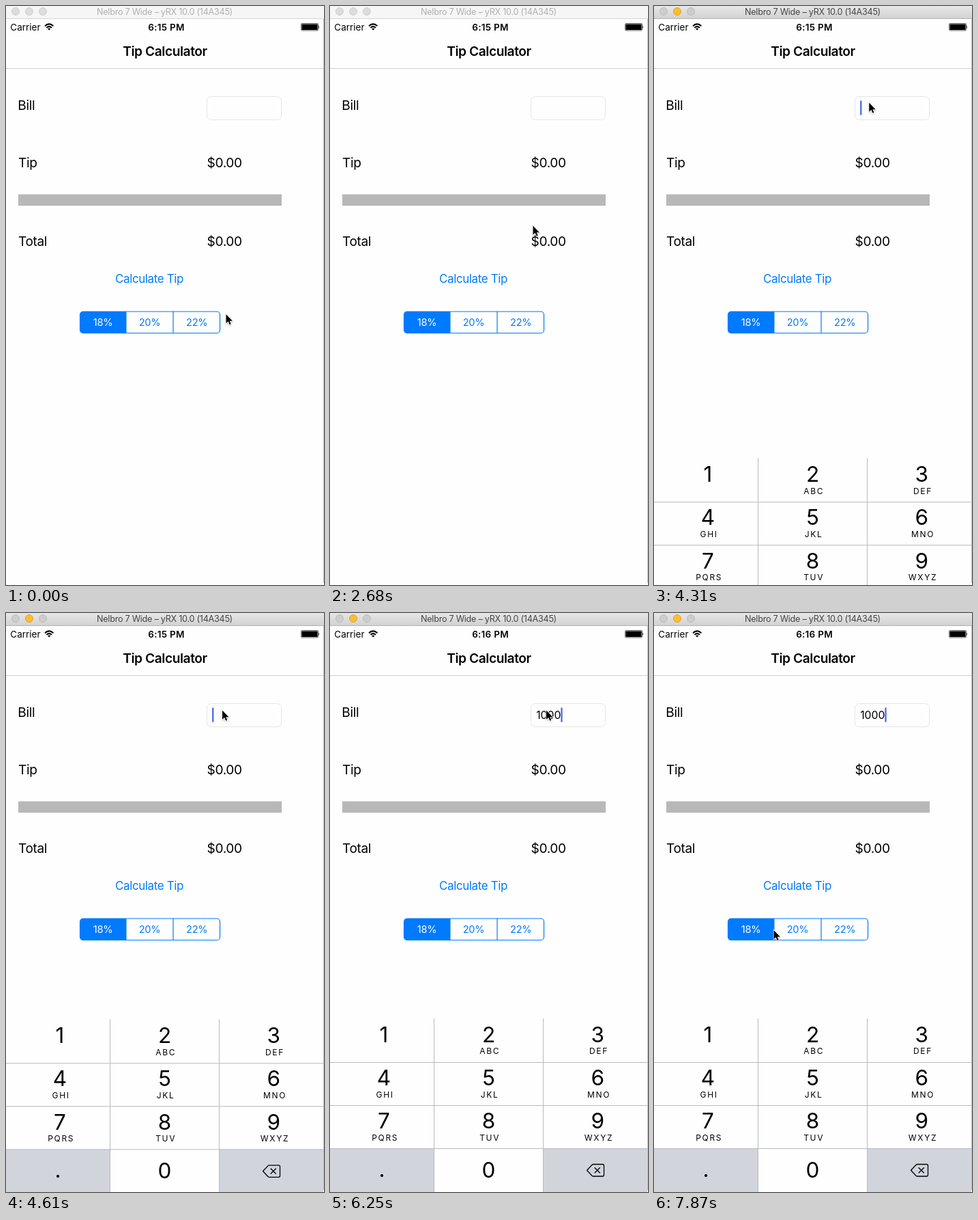
An HTML page for the animation above (8 s loop, 466 px wide and 847 px high).

```html
<!DOCTYPE html>
<html lang="en">
<head>
<meta charset="utf-8">
<title>Tip Calculator</title>
<style>
  html, body { margin: 0; width: 100%; height: 100%; overflow: hidden; background: #fefefe; }
  svg { display: block; width: 100vw; height: 100vh; }
  text { font-family: Inter, "Open Sans", sans-serif; font-size: 19.1px; letter-spacing: -.02em; white-space: pre; }
  .mid { text-anchor: middle; }
  .bold { font-weight: 600; }
  .status { font-size: 13.5px; letter-spacing: 0; }
  .clock { letter-spacing: .02em; }
  .bar { font-size: 12.6px; fill: #b0b0b0; }
  .button { font-size: 16.9px; fill: #007aff; }
  .seg { font-size: 14.6px; fill: #007aff; }
  .seg.on { fill: #fff; }
  .input { font-size: 15.75px; letter-spacing: 0; }
  .digit { font-size: 31.5px; letter-spacing: 0; }
  .letters { font-size: 12px; letter-spacing: 1.7px; }

  .chrome { fill: #f6f6f6; }
  .rule { stroke: #d6d6d6; }
  .light { fill: #dcdcdc; stroke: #d0d0d0; }
  .active .chrome { fill: url(#chrome); }
  .active .rule { stroke: #b4b4b4; }
  .active .bar { fill: #454545; }
  .active .light { fill: #cdcdcd; stroke: #bcbcbc; }
  .active .amber { fill: #fdbe30; stroke: #e0a32a; }
</style>
</head>
<body>
<svg viewBox="0 0 466 847" preserveAspectRatio="none">
  <defs>
    <linearGradient id="chrome" x2="0" y2="1">
      <stop stop-color="#e7e7e7"/><stop offset="1" stop-color="#d2d2d2"/>
    </linearGradient>
    <filter id="soft" x="-50%" y="-50%" width="200%" height="200%">
      <feDropShadow dx="0" dy="1" stdDeviation="1" flood-opacity=".35"/>
    </filter>
  </defs>
  <rect width="466" height="847" fill="#fefefe"/>

  <g id="window">
    <rect class="chrome" width="466" height="18"/>
    <path class="rule" d="M0 18.5H466"/>
    <circle class="light" cx="14" cy="8" r="5.5"/>
    <circle class="light amber" cx="34" cy="8" r="5.5"/>
    <circle class="light" cx="54" cy="8" r="5.5"/>
    <text class="bar mid" x="232.5" y="13">Nelbro 7 Wide – yRX 10.0 (14A345)</text>
  </g>

  <text class="status" x="6.3" y="35.5">Carrier</text>
  <g fill="none" stroke="#000" stroke-width="2">
    <path d="M57 29.2Q63.2 23.6 69.4 29.2M59.4 31.8Q63.2 28.4 67 31.8"/>
    <path d="M61 33.2Q63.2 31.6 65.4 33.2L63.2 35.6Z" fill="#000" stroke="none"/>
  </g>
  <text id="clock" class="status clock bold mid" x="235" y="35.5"></text>
  <rect x="432.5" y="25.5" width="25" height="10.5" rx="1.5" fill="none" stroke="#000" stroke-width=".6"/>
  <rect x="433.4" y="26.4" width="23.2" height="8.7" rx=".6"/>
  <path d="M458.3 28.8q1.8 2 0 4z"/>

  <text class="bold mid" x="233" y="73">Tip Calculator</text>
  <path d="M0 91.5H465" stroke="#cfcfcf"/>

  <text x="17.3" y="152">Bill</text>
  <rect x="294.5" y="132.5" width="109" height="34" rx="6" fill="#fefefe" stroke="#e6e6e6"/>
  <text id="bill" class="input" x="302.2" y="155"></text>
  <rect id="caret" y="138.5" width="2.3" height="21" fill="#426bf2"/>

  <text x="18" y="236">Tip</text>
  <text x="294.6" y="236">$0.00</text>
  <rect x="18" y="275.5" width="386" height="16.7" fill="#b8b8b8"/>
  <text x="18" y="351">Total</text>
  <text x="294.6" y="351">$0.00</text>
  <text class="button mid" x="210" y="404.8">Calculate Tip</text>

  <rect x="108.5" y="447" width="205" height="31.5" rx="4.5" fill="#fefefe" stroke="#007aff" stroke-width="1.2"/>
  <path d="M176.5 447H113a4.5 4.5 0 0 0-4.5 4.5V474a4.5 4.5 0 0 0 4.5 4.5H176.5Z" fill="#007aff"/>
  <path d="M245 447V478.5" stroke="#007aff" stroke-width="1.2"/>
  <text class="seg on mid" x="142" y="468.2">18%</text>
  <text class="seg mid" x="210.5" y="468.2">20%</text>
  <text class="seg mid" x="279.7" y="468.2">22%</text>

  <g id="keys">
    <rect width="465" height="255" fill="#fefefe"/>
    <path d="M0 190.5H152.5V255H0ZM312.5 190.5H465V255H312.5Z" fill="#d1d4db"/>
    <path d="M152.5 0V255M312.5 0V255M0 64.5H465M0 127.5H465M0 190.5H465" stroke="#b9babd" fill="none"/>
    <g fill="none" stroke="#000" stroke-width="1.3" stroke-linejoin="round">
      <path d="M376.5 222.2L384 214.3q.8-.8 2-.8H399.5q2 0 2 2V229q0 2-2 2H386q-1.2 0-2-.8Z"/>
      <path d="M387.7 218.2l8 8m0-8l-8 8"/>
    </g>
  </g>
  <path d="M465.5 19V844" stroke="#bdbdbd"/>
  <path id="pointer" d="M0 0V14.6L3.4 11.5 5.7 16.8 8 15.8 5.7 10.7H10.4Z"
        stroke="#fff" stroke-width="1.5" paint-order="stroke" filter="url(#soft)"/>
</svg>
<script>
const LOOP = 8000, TICK = 148.5; // the screen refreshes once per tick
const FOCUS = 26, SLIDE = 27.92, EDIT = 28, MINUTE = 33, TYPE = 35, LAST_KEY = 39;
const KEYS_TOP = 593, KEYS_HEIGHT = 254;

const home = [322.5, 451];
// Pointer moves: first tick, last tick, destination.
const moves = [
  [0, 1, 323.5, 384], [2, 5, 266, 713], [7, 10, 295.5, 338.5], [12, 14, 297.5, 321.5],
  [18, 25, 313.5, 140.5], [27, 31, 317, 142.5], [42, 44, 271, 261], [45, 50, 153.5, 457], [50, 53, 175.5, 464]
];

const $ = id => document.getElementById(id);
const clamp = (v, lo, hi) => Math.min(hi, Math.max(lo, v));
const smooth = u => u * u * (3 - 2 * u);

function pointerAt(n) {
  let [x, y] = home;
  for (const [from, to, toX, toY] of moves) {
    const u = smooth(clamp((n - from) / (to - from), 0, 1));
    x += (toX - x) * u;
    y += (toY - y) * u;
  }
  return [x, y];
}

// Critically damped spring, settling at KEYS_TOP.
function keysAt(n) {
  const k = 2.4 * Math.max(0, n - SLIDE);
  return KEYS_TOP + KEYS_HEIGHT * (1 + k) * Math.exp(-k);
}

const typedAt = n => clamp(n - TYPE + 1, 0, 3) + (n >= LAST_KEY);
const caretOn = n => n >= EDIT && (n - (n < TYPE ? EDIT : LAST_KEY)) % 7 < 5;

function label(cls, x, y, str) {
  const el = document.createElementNS("http://www.w3.org/2000/svg", "text");
  el.setAttribute("class", cls + " mid");
  el.setAttribute("x", x);
  el.setAttribute("y", y);
  el.textContent = str;
  $("keys").append(el);
}

["", "ABC", "DEF", "GHI", "JKL", "MNO", "PQRS", "TUV", "WXYZ"].forEach((str, i) => {
  const x = [79, 232.5, 392.3][i % 3], y = Math.floor(i / 3) * 63.3;
  label("digit", x, 34.8 + y, i + 1);
  label("letters", x + 1.7, 52.3 + y, str);
});
label("digit", 232.5, 233, "0");
label("digit", 76, 231.5, ".");

function draw(time) {
  const n = Math.floor((time % LOOP + 5) / TICK);
  $("window").classList.toggle("active", n >= FOCUS);
  $("pointer").setAttribute("transform", `translate(${pointerAt(n)}) scale(.9)`);
  $("keys").setAttribute("transform", `translate(0 ${keysAt(n)})`);
  $("clock").textContent = n < MINUTE ? "6:15 PM" : "6:16 PM";
  $("bill").textContent = "1000".slice(0, typedAt(n));
  $("caret").setAttribute("x", 302.1 + $("bill").getComputedTextLength());
  $("caret").setAttribute("opacity", caretOn(n) ? 1 : 0);
}

const start = performance.now();
function tick() {
  draw(performance.now() - start);
  requestAnimationFrame(tick);
}
tick();
</script>
</body>
</html>
```
